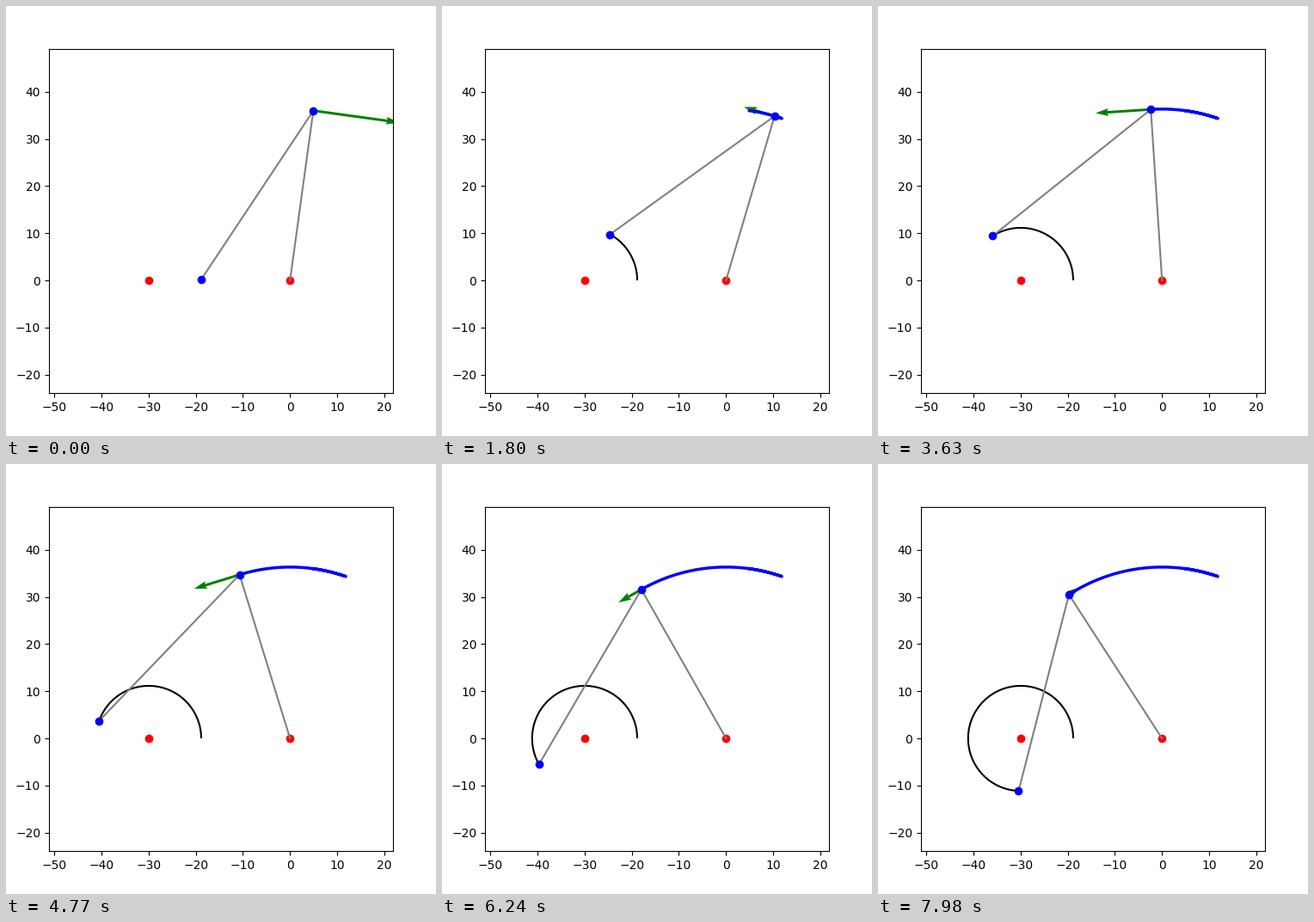
Recreate the animation shown at these times as a matplotlib script. Size 500 by 500 pixels, loop 8000 ms.

```python
import numpy as np
import matplotlib.pyplot as plt
from matplotlib.animation import FuncAnimation

GROUND, CRANK, COUPLER, ROCKER = 30, 11.15, 43.0, 36.35
FRAMES, LOOP_MS = 267, 8000
MARGIN = 10


def solve(theta):
    """Crank pin, rocker pin and rocker pin velocity for crank angles theta."""
    pin = np.array([-GROUND + CRANK * np.cos(theta), CRANK * np.sin(theta)])
    dist = np.hypot(*pin)
    u = -pin / dist
    normal = np.array([-u[1], u[0]])
    along = (COUPLER**2 - ROCKER**2 + dist**2) / (2 * dist)
    tip = pin + along * u + np.sqrt(COUPLER**2 - along**2) * normal

    link = np.arctan2(*(tip - pin)[::-1])
    rock = np.arctan2(*tip[::-1])
    speed = CRANK * np.sin(theta - link) / np.sin(rock - link)
    return pin, tip, speed * np.array([-np.sin(rock), np.cos(rock)])


pin, tip, vel = solve(np.linspace(0, 2 * np.pi, 360)[1:])

fig = plt.figure(figsize=(5, 5), dpi=100)
ax = fig.add_axes([0.1, 0.1, 0.8, 0.8])

left = -GROUND - CRANK - MARGIN
right = tip[0].max() + MARGIN
mid, half = (ROCKER - CRANK) / 2, (right - left) / 2
ax.set_xlim(left, right)
ax.set_ylim(mid - half, mid + half)
ax.set_xticks(range(-50, 21, 10))
ax.set_yticks(range(-20, 41, 10))

ax.plot([-GROUND, 0], [0, 0], "o", color="red")
pin_path, = ax.plot([], [], color="black", lw=1.5)
tip_path, = ax.plot([], [], color="blue", lw=2.5)
links, = ax.plot([], [], color="gray", lw=1.5)
joints, = ax.plot([], [], "o", color="blue")
arrow = ax.quiver([0], [0], [1], [0], color="green", scale=84, width=0.0075)


def update(i):
    a, b = pin[:, i], tip[:, i]
    pin_path.set_data(*pin[:, :i + 1])
    tip_path.set_data(*tip[:, :i + 1])
    links.set_data([a[0], b[0], 0], [a[1], b[1], 0])
    joints.set_data([a[0], b[0]], [a[1], b[1]])
    arrow.set_offsets([b])
    arrow.set_UVC(*vel[:, i:i + 1])
    return pin_path, tip_path, links, joints, arrow


anim = FuncAnimation(fig, update, frames=FRAMES, interval=LOOP_MS / FRAMES,
                     init_func=lambda: update(0), repeat=True, repeat_delay=0)
plt.show()
```
